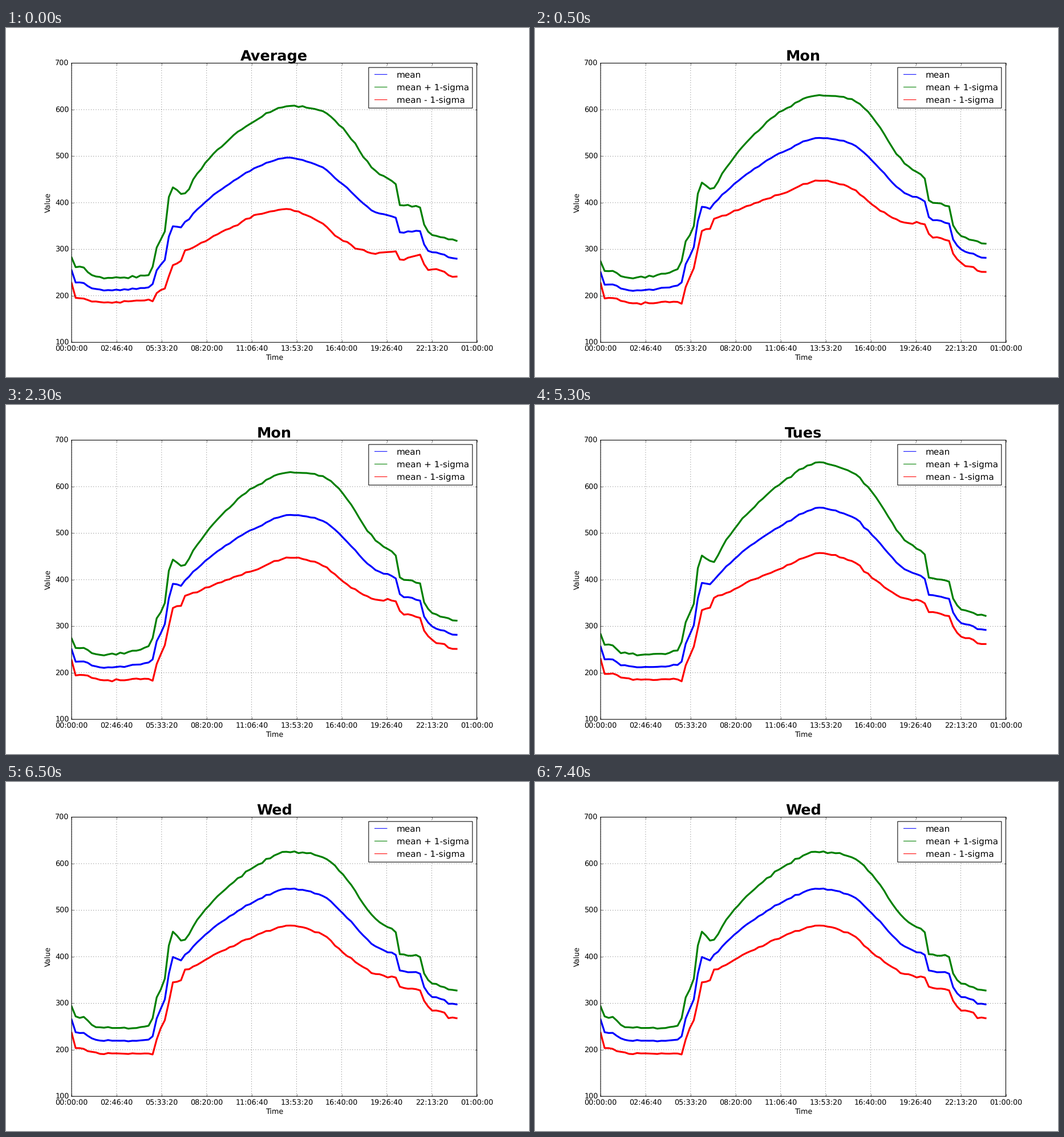
Recreate the animation shown at these times as a matplotlib script. Size 917 by 611 pixels, loop 8000 ms.

```python
import matplotlib.pyplot as plt
import numpy as np
from matplotlib.animation import FuncAnimation

W, H = 917, 611
DPI = 76.375
INTERVAL = 500              # ms
SAMPLES = np.arange(96)     # one per quarter of an hour
ROUGHNESS = 1.1             # spread of the small random wobble

# Turning points of a typical day: sample, upper curve, lower curve.
TYPICAL = np.array([
    (0, 283, 232), (1, 262, 199), (3, 261, 198), (5, 246, 191), (9, 241, 187),
    (19, 251, 189), (20, 269, 186), (21, 312, 220), (23, 349, 261),
    (24, 423, 299), (25, 449, 340), (27, 435, 345), (28, 435, 367),
    (30, 467, 373), (36, 533, 397), (45, 600, 430), (54, 636, 457),
    (62, 623, 440), (67, 584, 404), (75, 484, 361), (80, 452, 354),
    (81, 405, 333), (86, 396, 323), (87, 358, 299), (89, 335, 278),
    (92, 327, 271), (93, 324, 263), (95, 320, 260)], dtype=float).T

# Samples at which a day's departure from the typical one is given.
ANCHORS = [0, 20, 25, 45, 54, 65, 80, 90]

rng = np.random.default_rng(4)


def smooth(x, px, py):
    """Cubic curve through the points that never overshoots them."""
    step = np.diff(px)
    slope = np.diff(py) / step
    left, right = slope[:-1], slope[1:]
    same = left * right > 0
    inner = np.zeros_like(left)
    inner[same] = 2 * left[same] * right[same] / (left + right)[same]
    m = np.concatenate([slope[:1], inner, slope[-1:]])
    i = np.clip(np.searchsorted(px, x, "right") - 1, 0, len(step) - 1)
    t = (x - px[i]) / step[i]
    return ((1 + 2 * t) * (1 - t) ** 2 * py[i] + t ** 2 * (3 - 2 * t) * py[i + 1]
            + step[i] * (t * (1 - t) ** 2 * m[i] - t ** 2 * (1 - t) * m[i + 1]))


def make_curve(typical, shift):
    return (smooth(SAMPLES, TYPICAL[0], typical)
            + np.interp(SAMPLES, ANCHORS, shift)
            + rng.normal(0, ROUGHNESS, len(SAMPLES)))


def make_day(name, upper_shift, lower_shift):
    """Return the title and the mean, upper and lower curves."""
    high = make_curve(TYPICAL[1], upper_shift)
    low = make_curve(TYPICAL[2], lower_shift)
    return name, ((high + low) / 2, high, low)


average = make_day("Average", [0, -6, -14, -25, -28, -27, -11, -2],
                   [-5, 2, -74, -58, -72, -90, -60, -19])
monday = make_day("Mon", [-9, 6, -6, -1, -6, 0, 0, -8],
                  [-4, -2, 1, -10, -10, -9, 0, -9])
tuesday = make_day("Tues", [0, -4, 3, 10, 17, 6, 0, 1],
                   [0, -3, -6, -4, 0, 1, -2, 0])
wednesday = make_day("Wed", [10, 0, 2, -8, -10, -8, -1, 8],
                     [5, 3, 4, 14, 10, 6, 1, 8])

# One entry per half second.
SCHEDULE = [average] + [monday] * 6 + [tuesday] * 6 + [wednesday] * 3


def clock(seconds):
    hours, rest = divmod(seconds, 3600)
    return f"{hours % 24:02d}:{rest // 60:02d}:{rest % 60:02d}"


plt.style.use("classic")
plt.rcParams.update({"font.family": "DejaVu Sans", "savefig.dpi": "figure",
                     "text.hinting": "none", "path.snap": False})

# The tiny addition guards the pixel width against rounding down.
fig = plt.figure(figsize=(W / DPI + 1e-9, H / DPI), dpi=DPI, facecolor="white")
ax = fig.add_axes([115 / W, 60.7 / H, 710.5 / W, 488.8 / H])
ax.set_xlim(0, 90000)
ax.set_ylim(100, 700)
ticks = range(0, 90001, 10000)
ax.set_xticks(ticks, [clock(t) for t in ticks])
ax.set_yticks(range(100, 701, 100))
ax.set_xlabel("Time")
ax.set_ylabel("Value")
ax.grid(True)
title = ax.set_title("", fontsize=24, fontweight="bold", y=1.0)

labels = ["mean", "mean + 1-sigma", "mean - 1-sigma"]
lines = [ax.plot([], [], color=c, lw=1, label=label)[0]
         for c, label in zip("bgr", labels)]
ax.legend(loc="upper right")
# The legend keeps its thin samples; only the curves are thick.
for line in lines:
    line.set_linewidth(3)


def update(frame):
    name, curves = SCHEDULE[frame]
    title.set_text(name)
    for line, values in zip(lines, curves):
        line.set_data(SAMPLES * 900, values)
    return [title, *lines]


anim = FuncAnimation(fig, update, frames=len(SCHEDULE), interval=INTERVAL,
                     repeat=True, repeat_delay=0, blit=False)
plt.show()
```
